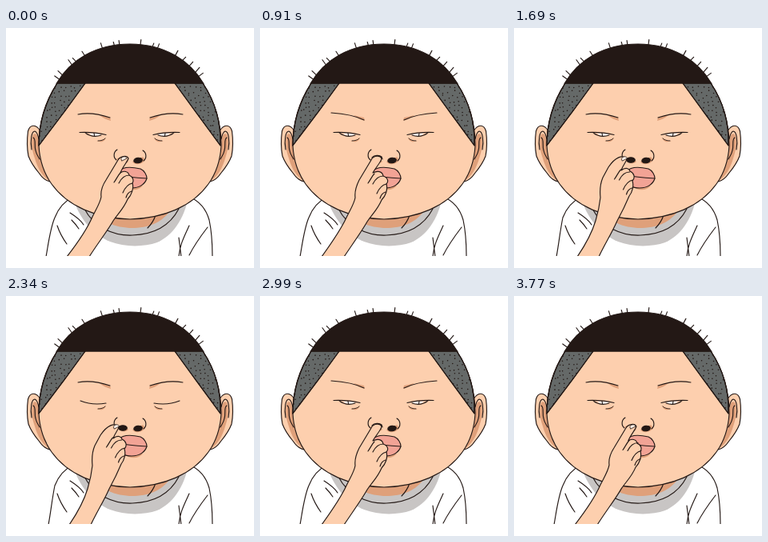
These frames come from a looping animation (310x300 px, 3900 ms). An HTML page:

```html
<!DOCTYPE html>
<html lang="en">
<head>
<meta charset="utf-8">
<title>Nose picker</title>
<style>
html, body { margin: 0; width: 100%; height: 100%; overflow: hidden; background: #fff; }
svg { display: block; width: 310px; height: 300px; }
.line { fill: none; }
.skin { fill: #fdcfae; }
.shade { fill: #dfa07a; stroke: none; }
.grey { fill: #c8c5c4; stroke: none; }
.ink { fill: #231815; }
</style>
</head>
<body>
<svg viewBox="0 0 310 300" stroke="#231815" stroke-width="1.15" stroke-linecap="round" stroke-linejoin="round">
  <defs>
    <clipPath id="stage"><path d="M0 0H310V285H0Z"/></clipPath>
    <path id="sides" d="M64 69H99L75 102L41 147C41 117 49 93 64 69ZM246 69H211L235 102L268 147C269 117 262 93 246 69Z"/>
    <clipPath id="shaved"><use href="#sides"/></clipPath>
    <g id="ear">
      <path class="skin" d="M41 126C37 121 30 120 27.500 129C26 140 26.500 152 28 160C31 168 36 175 41 181C45 187 49 191 55 192L60 150Z"/>
      <path class="shade" d="M34 133C39 130 41 138 41 150C42 164 47 179 56 191C46 188 39 174 36 163C32 152 31 140 34 133Z"/>
      <path class="line" d="M32 152C30 140 32 129 36 129C39 130 40 134 41 139M34 137C38 139 35 147 37 153C38 158 40 160 42 164"/>
    </g>
    <g id="eye">
      <path fill="#fff" stroke="none" d="M104 131.500L120 132.500C115 136 108 136 104 131.500Z"/>
      <path class="line" d="M92 130.500C103 130 115 131 125 133.500M99 131C105 135.500 113 136 119 134"/>
      <path class="line" d="M110 131.500L110.500 134.500"/>
    </g>
    <path id="lash" class="line" d="M93 131C103 135 114 136 125 134"/>
    <g id="crease">
      <path class="shade" d="M113 141C119 141 122 140 125 137C123 143 118 143 113 141Z"/>
      <path class="shade" d="M117 109L130 112L131 116C127 115 122 113 117 109Z"/>
      <path class="line" stroke-width=".9" d="M115 141C119 141 122 140 124 138"/>
    </g>
  </defs>
  <g clip-path="url(#stage)">
    <path id="shirt" fill="#fff"/>
    <path class="grey" d="M84 212C90 236 108 258 130 267C148 274 172 274 189 268C209 259 222 239 228 212Z"/>
    <path class="line" d="M80 231C88 236 94 241 97 246M82 240C86 244 89 248 91 251M64 247C67 256 71 263 76 270M229 247C222 262 217 272 216 286M216 262C217 270 218 278 219 286M252 249C242 262 235 272 229 284"/>
    <path class="line" d="M98 226C110 249 134 260 158 259C187 258 206 245 216 226"/>
    <path class="shade" stroke="#231815" d="M106 224C116 242 138 250.500 160 250C183 249 198 241 208 224Z"/>
    <path class="line" stroke="#231815" d="M187 234C185 240 181 246 177 250"/>

    <use href="#ear"/>
    <use href="#ear" transform="matrix(-1 0 0 1 310 0)"/>
    <path class="skin" d="M64 69C48 93 41 117 41 147C42 165 47 181 57 195C77 223 113 238 155 239C197 238 233 223 253 195C263 181 268 165 269 147C269 117 262 93 246 69Z"/>
    <use href="#sides" fill="#656968"/>
    <g id="stubble" class="ink" stroke="none" clip-path="url(#shaved)"/>
    <use href="#sides" fill="none"/>
    <path id="crown" class="ink" d="M63 69.500C80 40 112 20 155 20C199 20 230 41 247 69.500"/>
    <path id="spikes" class="line"/>

    <use href="#crease"/>
    <use href="#crease" transform="matrix(-1 0 0 1 310 0)"/>
    <path id="brows" class="line"/>
    <g id="open">
      <use href="#eye"/>
      <use href="#eye" transform="matrix(-1 0 0 1 309 0)"/>
    </g>
    <g id="shut">
      <use href="#lash"/>
      <use href="#lash" transform="matrix(-1 0 0 1 310 0)"/>
    </g>

    <path class="shade" d="M148 197C153 204 166 204 171 197Z"/>
    <path fill="#f2a395" d="M141 179C146 173 159 174 168 176C173 178 176 184 176 188C174 195 167 200 157 200C149 200 142 197 140 190Z"/>
    <path class="line" d="M141 184C149 186 158 187 176 188"/>
    <path class="shade" d="M158 167C161 172 170 171 174 165L171 161ZM138 163C142 170 149 171 153 167L148 162Z"/>
    <ellipse class="ink" cx="165" cy="165.500" rx="5.300" ry="3.200" transform="rotate(-8 165 165)"/>
    <ellipse class="ink" cx="146" cy="165" rx="5.300" ry="3.200"/>
    <path class="line" d="M139 152C134 155 134 162 138 165M171 153C176 156 176 163 172 166"/>

    <path id="hand" class="skin"/>
    <g id="folds">
      <path class="line" d="M143 181C140 184 138 189 135 193M154 184C149 184 144 188 141 194M158 194C153 195 149 199 146 206M157 204C154 205 151 208 150 212"/>
    </g>
    <path id="nail" fill="#fff0e7" stroke-width=".8" d="M144 163C146 160 150 160 151 163C149 164 147 165 145 166Z"/>
    <path id="rim" class="line" d="M140 162C143 159 149 158.500 152 161L153 164"/>
  </g>
</svg>
<script>
const el = id => document.getElementById(id);
const mix = (a, b, p) => {
  const to = b.match(/-?[\d.]+/g);
  let i = 0;
  return a.replace(/-?[\d.]+/g, n => +n + (to[i++] - n) * p);
};

// All hands share one command structure so that they can be blended.
const hands = {
  shallow: "M76 286C90 268 102 250 108 236C113 226 118 218 119 211C118 203 121 196 125 190L140 165C142 161 151 158 153 163C152 167 146 173 143 181C147 178 153 179 154 184C159 186 160 191 158 194C160 200 157 209 152 214C147 226 140 232 134 241C128 252 114 270 104 286",
  deep: "M77 286C90 268 102 250 108 237C113 227 118 219 119 212C118 204 121 196 124 190L139 165C141 160 150 158 152 163C151 168 145 174 141 181C147 178 153 179 154 185C160 187 161 192 158 195C160 202 157 210 152 215C147 227 140 233 134 242C128 253 115 271 105 286",
  leaving: "M79 286C90 270 99 254 103 241C107 231 109 222 110 213C109 203 110 195 112 189L119 174C124 165 138 159 145 163C145 167 138 172 135 180C141 174 147 175 148 180C153 182 155 188 152 192C154 198 152 206 148 211C142 222 137 230 130 241C124 255 114 271 107 286",
  resting: "M79 286C90 270 98 254 102 241C105 231 107 221 108 212C107 202 108 194 111 187L118 174C126 162 135 158 141 163C141 167 136 171 134 178C139 174 144 175 145 179C150 181 152 187 148 191C150 197 148 205 144 210C139 222 135 230 129 241C123 255 113 271 106 286"
};
const flat = "M90 108C104 105 118 108 130 112M180 112C192 108 206 105 221 108";
const frown = "M89 106C104 107 118 109 130 115M180 115C192 109 206 107 221 106";

// Each pose: hand outline, fold offset x and y, brow tension, sleeve shift
const poses = {
  0: [hands.shallow, 0, 0, 0, 0],
  1: [mix(hands.shallow, hands.deep, .1), 1, -.5, 0, 0],
  2: [mix(hands.shallow, hands.deep, .55), 0, .5, .5, 0],
  3: [hands.deep, 0, 1, 1, 0],
  C: [hands.leaving, -6, -3, 0, 3],
  E: [mix(hands.leaving, hands.resting, .6), -8, -4, 0, 3],
  D: [hands.resting, -9.500, -4, 0, 3],
  X: [hands.resting, -9.500, -4, 0, 3]
};
const order = "01230123012" + "CEDDDDDXC" + "0123012301";
const step = 130;

function drawHair() {
  let seed = 7, dots = "";
  const rnd = () => (seed = seed * 16807 % 2147483647) / 2147483647;
  for (let y = 72; y < 148; y += 6)
    for (let x = 42; x < 270; x += 6)
      dots += `<circle cx="${x + rnd() * 4}" cy="${y + rnd() * 4}" r=".8"/>`;
  el("stubble").innerHTML = dots;

  const crown = el("crown"), length = crown.getTotalLength();
  const roots = [.03, .06, .14, .17, .23, .34, .41, .44, .56, .63, .66, .77, .82, .87, .92, .95];
  el("spikes").setAttribute("d", roots.map((at, i) => {
    const { x, y } = crown.getPointAtLength(at * length);
    return `M${x} ${y}l${(at - .5) * 12} ${-4 - i % 3}`;
  }).join(""));
}

const display = (id, on) => el(id).style.display = on ? "" : "none";

function show(key) {
  const [hand, dx, dy, tension, shift] = poses[key];
  el("hand").setAttribute("d", hand);
  el("folds").setAttribute("transform", `translate(${dx} ${dy})`);
  el("nail").setAttribute("transform", `translate(${dx} 0)`);
  el("brows").setAttribute("d", mix(flat, frown, tension));
  display("nail", key !== "3");
  display("rim", key === "3");
  display("open", key !== "X");
  display("shut", key === "X");
  el("shirt").setAttribute("d",
    `M${50 + shift} 286C${53 + shift} 270 ${55 + shift} 251 61 237C66 224 74 216 84 211L229 211C241 216 250 226 254 240C257 254 258 270 258 286`);
}

let last;
function tick() {
  const key = order[Math.floor(performance.now() / step) % order.length];
  if (key !== last) show(last = key);
  requestAnimationFrame(tick);
}

drawHair();
tick();
</script>
</body>
</html>
```
